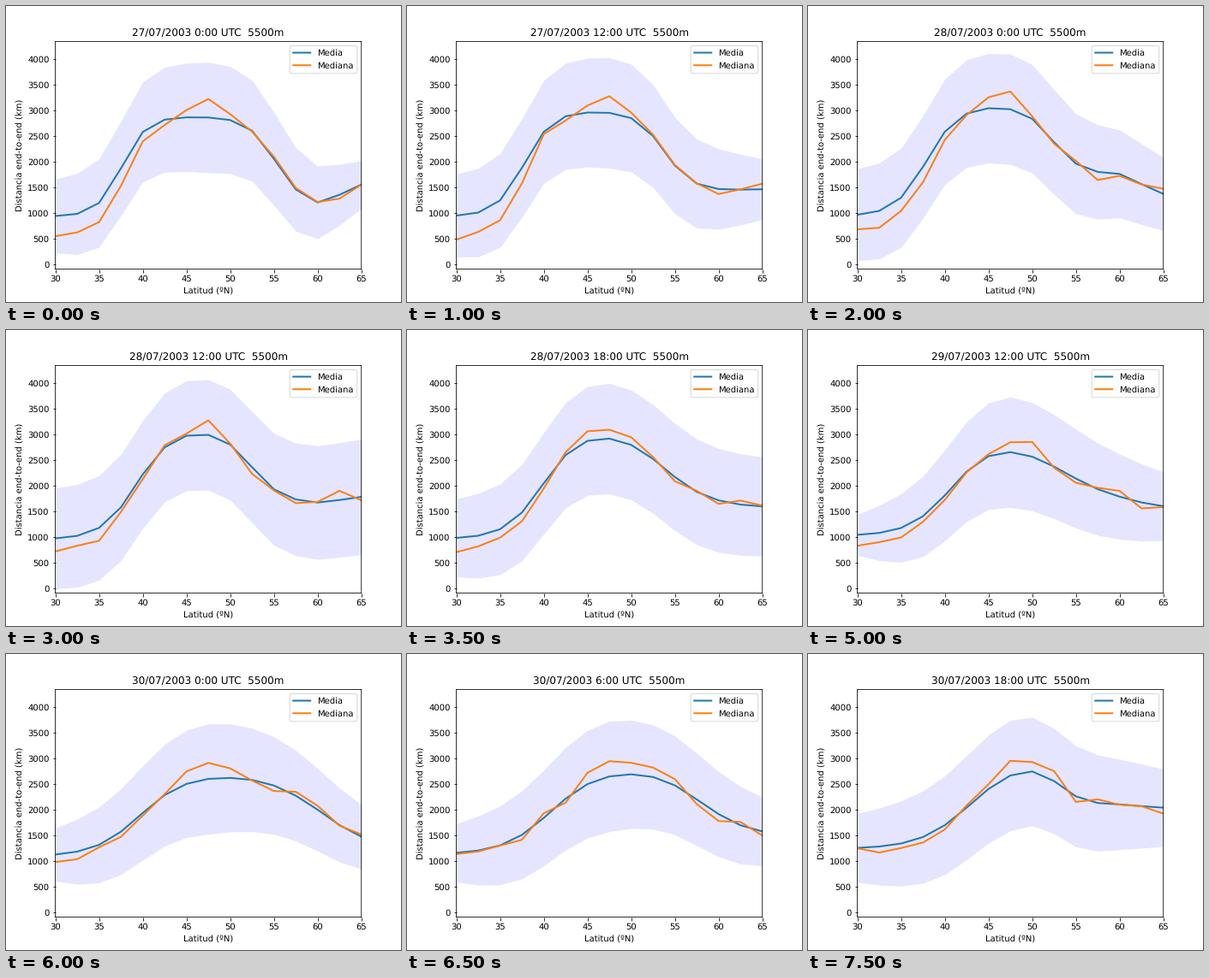
A matplotlib script that plays this animation: 461 px wide and 346 px high, repeating every 8 s.

```python
import numpy as np
import matplotlib.pyplot as plt
from matplotlib.animation import FuncAnimation

# Smooth, unsnapped drawing, as in a vector page
plt.rcParams.update({"path.snap": False, "text.hinting": "none"})

DPI = 72
WIDTH, HEIGHT = 461, 346
PAGE_W, PAGE_H = 460.8, 345.6  # page anchored at the top left
STEPS = 16                     # one every six hours
KEY_STEPS = [0, 4, 6, 8, 10, 12, 15]

lat = np.linspace(30, 65, 15)
step = np.arange(STEPS)[:, None]


def keyed(*values):
    """One value per step, interpolated between the key steps."""
    return np.interp(step, KEY_STEPS, values)


def ramp(center, width):
    """Smooth climb from 0 to 1 around a latitude."""
    return 1 / (1 + np.exp((center - lat) / width))


# Mean: a low foot, a climb to the top, a fall to the tail and a bent end
foot = 930 + 0.09 * step ** 3
top = keyed(2880, 3100, 3120, 3080, 2980, 2700, 3000)
tail = keyed(1120, 1750, 1650, 1520, 1600, 1300, 2100)
rise = keyed(37.6, 37.9, 39.3, 40.5, 40.8, 39.7, 43)
fall = keyed(55.2, 52.3, 52.4, 55.2, 53.5, 60, 53)
fall_width = keyed(1.6, 1.6, 1.8, 3.4, 3.5, 3, 1.5)
hook = keyed(430, -380, 130, -150, -50, -50, -60)
mean = (foot + (top - foot) * ramp(rise, 1.4 + 0.1 * step)
        - (top - tail) * ramp(fall, fall_width)
        + hook * np.clip((lat - 60) / 5, 0, 1))

# Band: widest in the middle, narrowing towards both edges
left = keyed(720, 900, 985, 540, 400, 520, 670)
right = keyed(470, 715, 1130, 810, 670, 630, 755)
u = (lat - 47.5) / 17.5
spread = 1080 - (1080 - np.where(u < 0, left, right)) * np.abs(u) ** 1.5

# Median: below the mean in the south, above it at the peak, and jagged
noise = np.random.default_rng(7).normal(0, 80, mean.shape)
median = (mean - (400 - 24 * step) * (1 - ramp(39, 2))
          + 260 * np.exp(-((lat - 47.5) / 3.5) ** 2) + noise)

# The small margin keeps the pixel size from rounding down
fig, ax = plt.subplots(figsize=((WIDTH + 0.01) / DPI, (HEIGHT + 0.01) / DPI), dpi=DPI)
fig.subplots_adjust(left=0.125 * PAGE_W / WIDTH, right=0.9 * PAGE_W / WIDTH,
                    top=1 - 0.12 * PAGE_H / HEIGHT,
                    bottom=1 - 0.89 * PAGE_H / HEIGHT)
band = ax.fill_between(lat, mean[0] - spread[0], mean[0] + spread[0],
                       color="b", alpha=0.1, lw=0)
mean_line, = ax.plot(lat, mean[0], lw=2, label="Media")
median_line, = ax.plot(lat, median[0], lw=2, label="Mediana")
ax.set(xlim=(30, 65), ylim=(-100, 4350), yticks=range(0, 4001, 500),
       xlabel="Latitud (ºN)", ylabel="Distancia end-to-end (km)")
ax.legend(loc="upper right")
title = ax.set_title("")


def update(i):
    mean_line.set_ydata(mean[i])
    median_line.set_ydata(median[i])
    low = np.column_stack([lat, mean[i] - spread[i]])
    high = np.column_stack([lat, mean[i] + spread[i]])
    band.set_verts([np.vstack([low, high[::-1]])])
    title.set_text(f"{27 + i // 4}/07/2003 {i % 4 * 6}:00 UTC  5500m")
    return band, mean_line, median_line, title


anim = FuncAnimation(fig, update, frames=STEPS, interval=500, repeat=True,
                     repeat_delay=0, blit=False)
plt.show()
```
